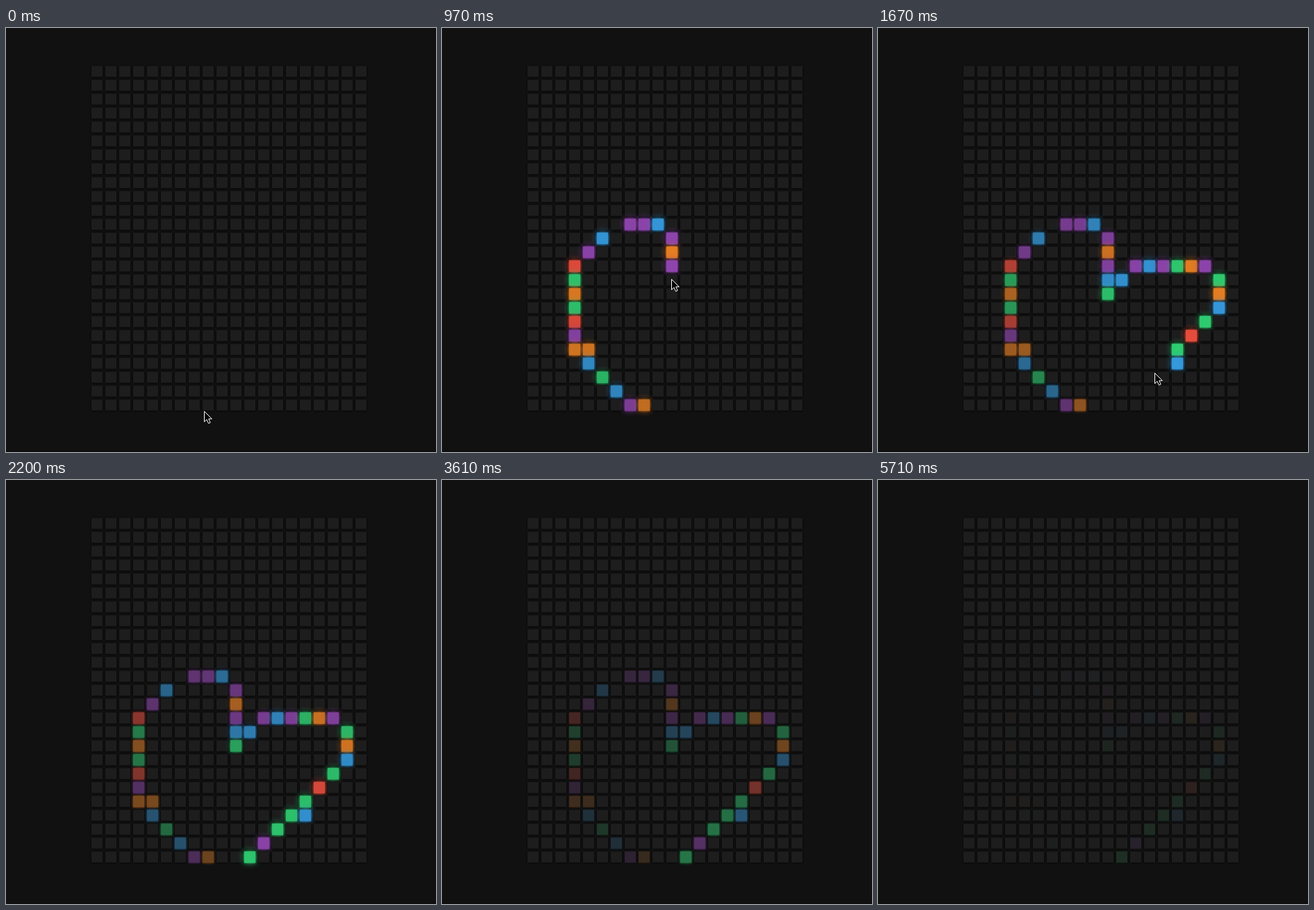
These frames come from a looping animation (619x610 px, 7.72 s). An HTML page with a canvas:

```html
<!DOCTYPE html>
<html lang="en">
<head>
<meta charset="utf-8">
<title>Hover board</title>
<style>
  html, body { margin: 0; width: 100%; height: 100%; overflow: hidden; background: #111; }
  canvas { display: block; }
</style>
</head>
<body>
<canvas id="stage" width="619" height="610"></canvas>
<script>
const ctx = document.getElementById('stage').getContext('2d');
const LOOP = 7720, STEP = 87.8, LAST_STEP = 65, FADE = 6200;
const COLS = 20, ROWS = 25, PITCH = 20, SIZE = 16, LEFT = 123, TOP = 54.5;
const BASE = [29, 29, 29];
const COLORS = {
  r: [231, 76, 60], p: [142, 68, 173], b: [52, 152, 219],
  o: [230, 126, 34], g: [46, 204, 113]
};

// Turning points of the pointer's two strokes, in columns and rows
const STROKES = [
  [[7.75, 24.4], [7, 24], [4, 21], [4, 20], [3, 20], [3, 14], [5, 12]],
  [[7.4, 11.2], [9, 11], [10, 12], [10, 16], [12, 14], [15, 13.6], [17, 14], [18, 15],
   [18, 17], [15, 20], [15, 21], [13.6, 21.45], [11, 24], [10, 29]]
];
const PAINT = 'opbgbooprgogrpbppbpopbgbpbpgopgobgrgbggpg';

// How far along the path the pointer is: step, cells
const PACE = [[0, 0], [7, 15.3], [15, 26.52], [19, 37.25], [23, 46]];

const mix = (a, b, t) => a + (b - a) * t;
const mixAll = (a, b, t) => a.map((v, i) => mix(v, b[i], t));
const rgba = (c, alpha = 1) => `rgba(${c.map(Math.round).join()},${alpha})`;

// Piecewise linear lookup in PACE, from one column to the other
function pace(value, from, to) {
  const i = Math.max(1, PACE.findIndex(key => key[from] >= value));
  const a = PACE[i - 1], b = PACE[i];
  return mix(a[to], b[to], (value - a[from]) / (b[from] - a[from]));
}

// One path point per cell crossed
const path = STROKES.flatMap(turns => turns.flatMap((point, i) => {
  if (i === 0) return [point];
  const prev = turns[i - 1];
  const reach = Math.max(Math.abs(point[0] - prev[0]), Math.abs(point[1] - prev[1]));
  const count = Math.round(reach);
  return Array.from({ length: count }, (_, n) => mixAll(prev, point, (n + 1) / count));
}));

const lit = new Map();
[...PAINT].forEach((key, n) => {
  const [col, row] = path[n].map(Math.round);
  lit.set(row * COLS + col, { start: pace(n + 0.5, 1, 0), color: COLORS[key] });
});

// CSS "ease": cubic-bezier(.25, .1, .25, 1)
function ease(x) {
  if (x >= 1) return 1;
  const bezier = (a, b, s) => 3 * a * s * (1 - s) ** 2 + 3 * b * s * s * (1 - s) + s ** 3;
  let low = 0, high = 1;
  for (let i = 0; i < 20; i++) {
    const mid = (low + high) / 2;
    if (bezier(0.25, 0.25, mid) < x) low = mid; else high = mid;
  }
  return bezier(0.1, 1, low);
}

function drawCell(index, step) {
  const x = LEFT + index % COLS * PITCH;
  const y = TOP + Math.floor(index / COLS) * PITCH;
  const cell = lit.get(index);
  const glow = cell && step >= cell.start ? 1 - ease((step - cell.start) * STEP / FADE) : 0;
  const color = cell ? cell.color : BASE;

  ctx.fillStyle = rgba(mixAll(BASE, color, glow));
  if (glow > 0) {
    ctx.shadowBlur = 10 * glow;
    ctx.shadowColor = rgba(color, glow);
    ctx.fillRect(x, y, SIZE, SIZE);
  }
  ctx.shadowBlur = 2;
  ctx.shadowColor = rgba(color.map(v => v * glow));
  ctx.fillRect(x, y, SIZE, SIZE);
}

// The pointer draws first, then comes back and sweeps along the lower edge
function pointerAt(step) {
  if (step < 23) {
    const along = pace(step, 0, 1), n = Math.floor(along);
    const [col, row] = mixAll(path[n], path[Math.min(n + 1, path.length - 1)], along - n);
    return [LEFT + SIZE / 2 + col * PITCH, TOP + SIZE / 2 + row * PITCH];
  }
  if (step >= 48 && step <= 57) return [213 + 44 * Math.max(0, step - 52), 598];
  return null;
}

const arrow = new Path2D('M0 0V15L3.5 11.8 6 17.3 8.6 16.2 6.2 10.8H10.8Z');

function drawPointer(step) {
  const tip = pointerAt(step);
  if (!tip) return;
  ctx.save();
  ctx.translate(Math.round(tip[0]) - 0.5, Math.round(tip[1]) + 0.5);
  ctx.fillStyle = '#000';
  ctx.strokeStyle = '#fff';
  ctx.fill(arrow);
  ctx.stroke(arrow);
  ctx.restore();
}

function draw(step) {
  ctx.shadowColor = 'transparent';
  ctx.fillStyle = '#111';
  ctx.fillRect(0, 0, 619, 610);
  ctx.fillStyle = '#0b0b0b';
  ctx.fillRect(0, 609, 619, 1);
  ctx.fillRect(618, 0, 1, 610);
  for (let i = 0; i < COLS * ROWS; i++) drawCell(i, step);
  ctx.shadowColor = 'transparent';
  drawPointer(step);
}

let shown = -1;
function tick() {
  const time = performance.now() % LOOP;
  const step = Math.min(LAST_STEP, Math.floor((time + 5) / STEP));
  if (step !== shown) draw(shown = step);
  requestAnimationFrame(tick);
}
tick();
</script>
</body>
</html>
```
